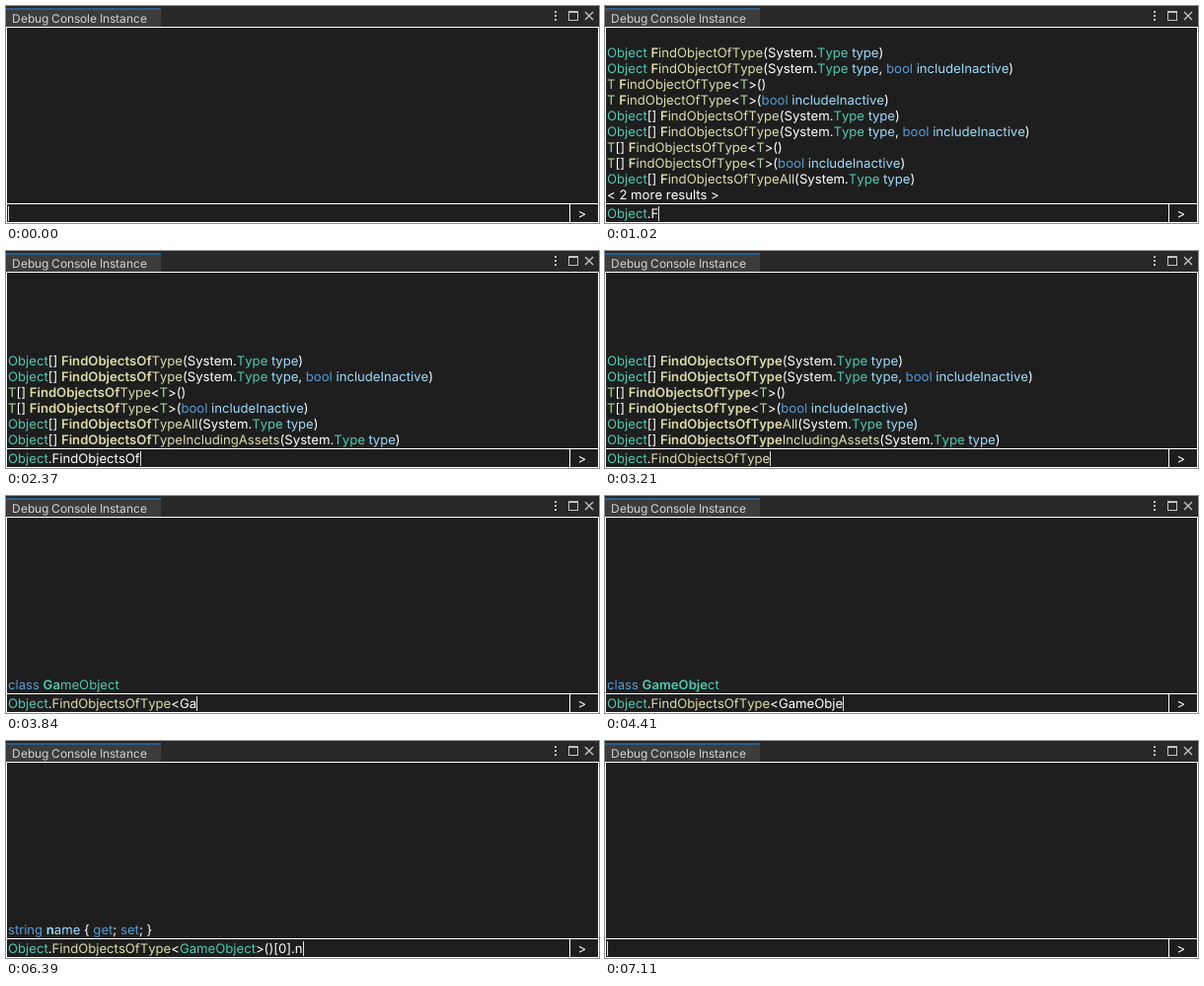
Write an HTML page with a canvas that moves like this. It is 601x220 px and loops after 7170 ms.

```html
<!DOCTYPE html>
<html lang="en">
<head>
<meta charset="utf-8">
<title>Debug console</title>
<style>
html, body { margin: 0; width: 100%; height: 100%; overflow: hidden; background: #1e1e1e; }
canvas { display: block; }
</style>
</head>
<body>
<canvas id="stage" width="601" height="220"></canvas>
<script>
const ctx = document.getElementById('stage').getContext('2d');
ctx.textRendering = 'geometricPrecision';
const LOOP = 7170, CLEAR = 7110, ROWS = 10, CODE_SIZE = 13.13;
const WHITE = '#fff', TEAL = '#4ec9b0', YELLOW = '#dcdcaa', BLUE = '#569cd6', SKY = '#9cdcfe', PALE = '#b8d7a3';

const command = 'Object.FindObjectsOfType<GameObject>()[0].name';
const keyTimes = [
  150, 300, 390, 450, 540, 630, 780,
  990, 1110, 1230, 1320, 1500, 1710, 1770, 1830, 1890, 1950, 1980, 2160, 2310, 2550, 2850, 2970, 3120, 3390,
  3750, 3840, 3930, 4020, 4170, 4230, 4320, 4380, 4590, 4740, 4920,
  5070, 5190, 5520, 5730, 5910, 6090, 6390, 6480, 6540, 6630];

const types = [
  'class GameObject', 'class GeometryUtility', 'class Gizmos', 'class GL', 'class Gradient',
  'class Graphics', 'class GUI', 'class GUILayout',
  'class Object', 'class OcclusionArea', 'class OcclusionPortal',
  'enum OpaqueSortMode', 'enum OperatingSystemFamily'];

const genericFinds = ['T[] FindObjectsOfType<T>()', 'T[] FindObjectsOfType<T>(bool includeInactive)'];

const objectMembers = [
  'void Destroy(Object obj)',
  'void Destroy(Object obj, float t)',
  'void DestroyImmediate(Object obj)',
  'void DestroyImmediate(Object obj, bool allowDestroyingAssets)',
  'void DontDestroyOnLoad(Object target)',
  'bool Equals(object objA, object objB)',
  'Object FindObjectOfType(System.Type type)',
  'Object FindObjectOfType(System.Type type, bool includeInactive)',
  'T FindObjectOfType<T>()',
  'T FindObjectOfType<T>(bool includeInactive)',
  'Object[] FindObjectsOfType(System.Type type)',
  'Object[] FindObjectsOfType(System.Type type, bool includeInactive)',
  ...genericFinds,
  'Object[] FindObjectsOfTypeAll(System.Type type)',
  'Object[] FindObjectsOfTypeIncludingAssets(System.Type type)',
  'Object[] FindSceneObjectsOfType(System.Type type)'];

const gameObjectMembers = [
  'bool activeInHierarchy { get; }',
  'bool activeSelf { get; }',
  'Component AddComponent(System.Type componentType)',
  'T AddComponent<T>()',
  'bool CompareTag(string tag)',
  'bool Equals(object other)',
  'GameObject gameObject { get; }',
  'Component GetComponent(System.Type type)',
  'T GetComponent<T>()',
  'int GetInstanceID()',
  'string name { get; set; }',
  'string tag { get; set; }',
  'Transform transform { get; }'];

const keywords = /^(class|enum|bool|int|float|string|object|void|get|set)$/;
const resolved = { Object: TEAL, GameObject: TEAL, FindObjectsOfType: YELLOW, name: SKY };

function signatureColor(word, next) {
  if (!/[A-Za-z]/.test(word) || word === 'System') return WHITE;
  if (keywords.test(word)) return BLUE;
  if (word === 'T') return PALE;
  if (/^[a-z]/.test(word)) return SKY;
  return next === '(' || next === '<' ? YELLOW : TEAL;
}

// Places glyphs one by one, without kerning; returns the end of the text.
function drawText(text, x, y, colorOf, { size = CODE_SIZE, bold = null, snap = false } = {}) {
  const range = bold && bold.exec(text);
  const from = range ? range.index : 0, to = range ? from + range[0].length : 0;
  for (const { 0: word, index } of text.matchAll(/\w+|\W/g)) {
    ctx.fillStyle = colorOf(word, text[index + word.length]);
    for (let i = 0; i < word.length; i++) {
      const strong = index + i >= from && index + i < to;
      ctx.font = `${strong ? 600 : 400} ${size}px Inter, sans-serif`;
      ctx.fillText(word[i], x, y);
      const { width } = ctx.measureText(word[i]);
      x += snap ? Math.round(width) : width;
    }
  }
  return x;
}

function suggest(typed) {
  const match = (list, prefix) => {
    const bold = new RegExp('\\b' + prefix);
    return { lines: list.filter(line => bold.test(line)), bold };
  };
  const prefix = /\w*$/.exec(typed)[0];
  const before = typed.slice(0, typed.length - prefix.length);
  if (!before) return match(prefix ? types : [], prefix);
  if (before === 'Object.') return match(objectMembers, prefix);
  if (before.endsWith('<')) return prefix ? match(types, prefix) : { lines: genericFinds, bold: /(?<=<)T/ };
  if (before.endsWith('(')) return { lines: genericFinds, bold: /bool includeInactive/ };
  if (before.endsWith('[') && !prefix) return { lines: ['GameObject[int index] { get; set; }'], bold: /int index/ };
  if (before.endsWith('].')) return match(gameObjectMembers, prefix);
  return { lines: [], bold: null };
}

function drawSuggestions(typed) {
  let { lines, bold } = suggest(typed);
  const extra = lines.length > ROWS ? lines.length - ROWS + 1 : 0;
  if (extra) lines = lines.slice(0, ROWS - 1);
  const top = 196 - 16 * (lines.length - (extra ? 0 : 1));
  lines.forEach((line, i) => drawText(line, 2, top + 16 * i, signatureColor, { bold }));
  if (extra) drawText(`< ${extra} more results >`, 2, 196, () => WHITE);
}

function rect(color, x, y, w, h) {
  ctx.fillStyle = color;
  ctx.fillRect(x, y, w, h);
}

function drawWindow() {
  rect('#1e1e1e', 0, 0, 601, 220);
  rect('#282828', 0, 0, 601, 21);
  rect('#3c3c3c', 0, 2, 157, 19);
  rect('#2c5d87', 0, 2, 157, 2);
  drawText('Debug Console Instance', 6, 17, () => '#d2d2d2', { size: 12, snap: true });

  const icon = '#c4c4c4';
  for (const y of [5, 9, 13]) rect(icon, 556, y, 2, 2);
  rect(icon, 570, 5, 10, 2);
  ctx.strokeStyle = icon;
  ctx.lineWidth = 1;
  ctx.strokeRect(570.5, 5.5, 9, 9);
  ctx.lineWidth = 1.4;
  ctx.beginPath();
  ctx.moveTo(587, 6); ctx.lineTo(595, 14);
  ctx.moveTo(595, 6); ctx.lineTo(587, 14);
  ctx.stroke();

  for (const y of [21, 200, 219]) rect(WHITE, 0, y, 601, 1);
  for (const [x, y] of [[0, 21], [600, 21], [571, 200]]) rect(WHITE, x, y, 1, 220 - y);
  drawText('>', 579.5, 215, () => WHITE);
}

function draw(now) {
  const t = now % LOOP;
  const count = t >= CLEAR ? 0 : keyTimes.filter(time => time <= t).length;
  const typed = command.slice(0, count);
  // Access, index and number keys refresh the list slightly late.
  const late = /[.[0]$/.test(typed) && t < keyTimes[count - 1] + 30;

  drawWindow();
  drawSuggestions(late ? typed.slice(0, -1) : typed);
  const end = drawText(typed, 2, 215, word => resolved[word] || WHITE);
  rect('#e0e0e0', Math.round(end), 203, 1, 15);
  requestAnimationFrame(() => draw(performance.now() - start));
}

const start = performance.now();
draw(0);
</script>
</body>
</html>
```
